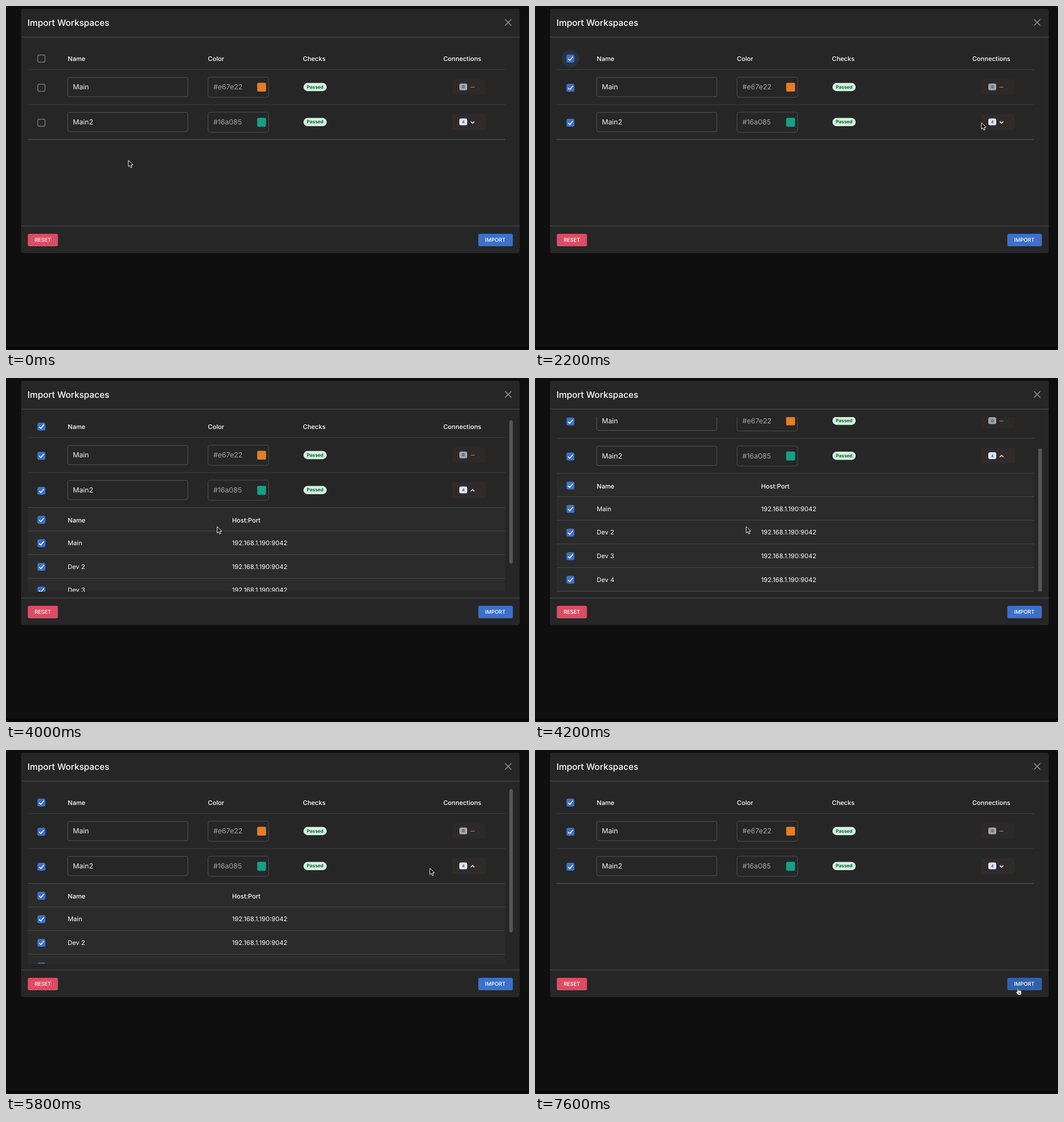
An HTML page for the animation above (8 s loop, 923 by 607 pixels).

```html
<!DOCTYPE html>
<html lang="en">
<head>
<meta charset="utf-8">
<title>Import Workspaces</title>
<style>
html, body { margin: 0; width: 100%; height: 100%; overflow: hidden; background: #0f0f0f; }
svg { display: block; }
text { font: 400 11.18px Inter, sans-serif; fill: #fff; text-rendering: geometricPrecision; }
.th { font-size: 11.12px; font-weight: 500; }
.title { font-size: 15.45px; font-weight: 500; }
.input { font-size: 12.36px; fill: #f2f2f2; }
.hex { font-size: 12.36px; fill: #a6a6a6; }
.btn { font-size: 9.27px; font-weight: 500; text-anchor: middle; }
.pill { font-size: 8.34px; font-weight: 700; fill: #0c6331; text-anchor: middle; }
.count { font-size: 6.95px; font-weight: 700; fill: #2c58a0; text-anchor: middle; }
</style>
</head>
<body>
<svg id="stage" width="923" height="607" viewBox="0 0 923 607"></svg>
<script>
const ROW_END = 235.5, VIEW_TOP = 69, VIEW_H = 308, SUB_H = 209, LOOP = 8000;
const MAX_SCROLL = ROW_END + SUB_H - VIEW_TOP - VIEW_H;
const CHECK = 900, OPEN = 2600, CLOSE = 6300, HOVER = 7600;

const rect = (x, y, w, h, r, fill, more = '') =>
  `<rect x="${x}" y="${y}" width="${w}" height="${h}" rx="${r}" fill="${fill}" ${more}/>`;
const text = (x, y, cls, s) => `<text x="${x}" y="${y}" class="${cls}">${s}</text>`;
const line = (y, color = '#414141', w = 1) => rect(38.5, y - w / 2, 842, w, 0, color);
const stroke = (d, color, w, more = '') =>
  `<path d="${d}" fill="none" stroke="${color}" stroke-width="${w}" ${more}/>`;

const checked = y => rect(55.5, y - 7, 14, 14, 3, '#3b71ca') +
  stroke(`M58.4 ${y + .3}l2.9 3 5.6-6.6`, '#fff', 1.6);
const checkbox = y =>
  `<g class="off">${rect(56.2, y - 6.3, 12.6, 12.6, 2.6, 'none', 'stroke="#757575" stroke-width="1.5"')}</g>` +
  `<g class="on">${checked(y)}</g>`;

function workspace(y, name, color, count) {
  return checkbox(y + 1.2) +
    rect(109, y - 17, 212, 34, 3, 'none', 'stroke="#555"') + text(118, y + 4.4, 'input', name) +
    rect(356.5, y - 17.5, 107, 35.5, 4, 'none', 'stroke="#4d4d4d"') + text(366, y + 4.4, 'hex', color) +
    rect(443.3, y - 7.5, 15.6, 15.6, 2, color) +
    rect(525, y - 7.2, 41, 14.4, 7.2, '#d6f0e0') + text(545.5, y + 2.6, 'pill', 'Passed') +
    `<g opacity="${count ? 1 : .65}">` +
    rect(788, y - 13.7, 58.5, 27.3, 3, '#302b2a') + (count ? '<g id="ripple"></g>' : '') +
    rect(800, y - 6.2, 14, 12, 3, '#dfe7f6') + text(807, y + 2.3, 'count', count) +
    (count ? stroke('', '#fff', 1.5, 'id="chevron"') : stroke(`M819.5 ${y + .3}h7.5`, '#b5b5b5', 1.3)) +
    '</g>';
}

const connections = ['Main', 'Dev 2', 'Dev 3', 'Dev 4'].map((name, i) => {
  const y = 298.3 + i * 41.65;
  return checked(y + .3) + text(109, y + 3.9, '', name) +
    text(399, y + 3.9, '', '192.168.1.190:9042') + line(y + 20.3, '#474747');
}).join('');

const $ = id => document.getElementById(id);
$('stage').innerHTML = `
<defs>
  <clipPath id="view"><rect x="38" y="${VIEW_TOP}" width="860" height="${VIEW_H}"/></clipPath>
  <clipPath id="subClip"><rect id="subRect" x="38" y="${ROW_END}" width="843" height="0"/></clipPath>
  <clipPath id="btnClip"><rect x="788" y="191.1" width="58.5" height="27.3" rx="3"/></clipPath>
  <radialGradient id="glow">
    <stop offset="0" stop-color="#fff" stop-opacity=".2"/>
    <stop offset=".6" stop-color="#fff" stop-opacity=".5"/>
    <stop offset=".7" stop-color="#fff" stop-opacity="0"/>
  </radialGradient>
</defs>
${rect(0, 601, 923, 6, 0, '#080808')}
${rect(26.5, 5, 880, 431, 4, '#262626')}
${text(38, 34.8, 'title', 'Import Workspaces')}
${stroke('M880.7 23.5l11 11m0-11l-11 11', '#9a9a9a', 1.4)}
${rect(26.5, 54, 880, 1.6, 0, '#414141')}
${rect(26.5, 387.5, 880, 1.6, 0, '#414141')}
${rect(38.5, 402, 53.2, 22, 3, '#dc4c64')}${text(65, 416.3, 'btn', 'RESET')}
<rect id="import" x="833.5" y="402" width="61" height="22" rx="3"/>${text(863.5, 416.3, 'btn', 'IMPORT')}
<g clip-path="url(#view)">
  <g id="scroll">
    <circle id="halo" cx="62.5" cy="92.7" r="15.5" fill="#3b71ca" opacity=".17"/>
    ${checkbox(92.7)}
    ${text(109, 97.4, 'th', 'Name')}${text(356.3, 97.4, 'th', 'Color')}
    ${text(524, 97.4, 'th', 'Checks')}${text(771.7, 97.4, 'th', 'Connections')}
    ${line(112.3)}${workspace(143, 'Main', '#e67e22', 0)}
    ${line(174)}${workspace(204.8, 'Main2', '#16a085', 4)}
    <g clip-path="url(#subClip)">
      ${rect(38.5, ROW_END, 842, SUB_H, 0, '#2b2b2b')}
      ${checked(257.3)}${text(109, 262, 'th', 'Name')}${text(399, 262, 'th', 'Host:Port')}
      ${line(277, '#474747')}${connections}
    </g>
    ${line(ROW_END, '#474747')}
    <g id="bottom">${line(ROW_END, '#4a4a4a', 1.6)}</g>
  </g>
  <rect id="thumb" x="888.3" width="6.2" rx="3" fill="#575757"/>
</g>
<g id="cursor" stroke="#fff" stroke-linejoin="round">
  <path id="arrow" d="M1.7 1.3V12.4L4.3 10.1 6.1 14.2 8.1 13.3 6.3 9.3H9.8z" fill="#000"/>
  <path id="hand" transform="translate(.8 1.5)" stroke="#111" stroke-width=".8" fill="#fff"
    d="M2.6 8.2V1.6a1 1 0 0 1 2 0V5.4a1 1 0 0 1 1.9.2 1 1 0 0 1 1.9.4 1 1 0 0 1 1.8.6V10l-1.1 3.4H4.2L.6 8.6c-.5-1 .6-1.6 1.3-.9zM5.4 8.6v3M7.2 8.6v3"/>
</g>`;

const smooth = p => p * p * (3 - 2 * p);
const speedUp = p => p * p;
const slowDown = p => 1 - (1 - p) ** 4;
const progress = (t, from, to, ease = smooth) =>
  ease(Math.min(1, Math.max(0, (t - from) / (to - from))));
// Rises to 1 in the first span and falls back to 0 in the second.
const thereAndBack = (t, a, b, c, d) => progress(t, a, b) - progress(t, c, d);

// Each move: start, end, goal x and y, easing.
const moves = [
  [0, 700, 59.5, 92],
  [900, 1700, 434, 226, speedUp],
  [1700, OPEN, 800.5, 204, slowDown],
  [2800, 3300, 371, 261],
  [5300, 5500, 599, 223],
  [5600, 5900, 798, 202],
  [6200, 6500, 665.5, 212.5],
  [6700, 6900, 737.5, 317.5],
  [7000, 7100, 822.5, 370.5],
  [7200, 7400, 847.5, 417.5]
];
function pointer(t) {
  let x = 214.3, y = 271;
  for (const [from, to, goalX, goalY, ease] of moves) {
    const p = progress(t, from, to, ease);
    x += (goalX - x) * p;
    y += (goalY - y) * p;
  }
  return `translate(${x} ${y})`;
}

const set = (id, attrs) => { for (const k in attrs) $(id).setAttribute(k, attrs[k]); };
const show = (el, on) => { el.style.display = on ? '' : 'none'; };

function draw(t) {
  const h = SUB_H * thereAndBack(t, 2550, 2930, 6260, 6635);
  const top = MAX_SCROLL * thereAndBack(t, 3950, 4200, 5220, 5430);
  const open = t >= OPEN && t < CLOSE;

  set('cursor', { transform: pointer(t) });
  show($('arrow'), t < HOVER);
  show($('hand'), t >= HOVER);
  set('import', { fill: t >= HOVER ? '#3061af' : '#3b71ca' });

  document.querySelectorAll('.on').forEach(el => show(el, t >= CHECK));
  document.querySelectorAll('.off').forEach(el => show(el, t < CHECK));
  show($('halo'), t >= CHECK && t < OPEN);

  set('scroll', { transform: `translate(0 ${-top})` });
  set('subRect', { height: h });
  set('bottom', { transform: `translate(0 ${h})` });
  set('chevron', { d: open ? 'M820.2 207l3.2-3.2 3.2 3.2' : 'M820.2 203.8l3.2 3.2 3.2-3.2' });

  const ratio = VIEW_H / (ROW_END + h - VIEW_TOP);
  show($('thumb'), ratio < 1);
  set('thumb', { y: VIEW_TOP + top * ratio, height: VIEW_H * ratio });

  const age = t - (t >= CLOSE ? CLOSE : OPEN);
  $('ripple').innerHTML = age >= 0 && age < 500
    ? `<g clip-path="url(#btnClip)"><circle cx="801" cy="205" r="${10 + age / 5}" fill="url(#glow)" opacity="${.95 * (1 - age / 500)}"/></g>`
    : '';
}

// The picture steps ten times a second.
function tick() {
  draw(Math.floor(performance.now() % LOOP / 100) * 100);
  requestAnimationFrame(tick);
}
tick();
</script>
</body>
</html>
```
